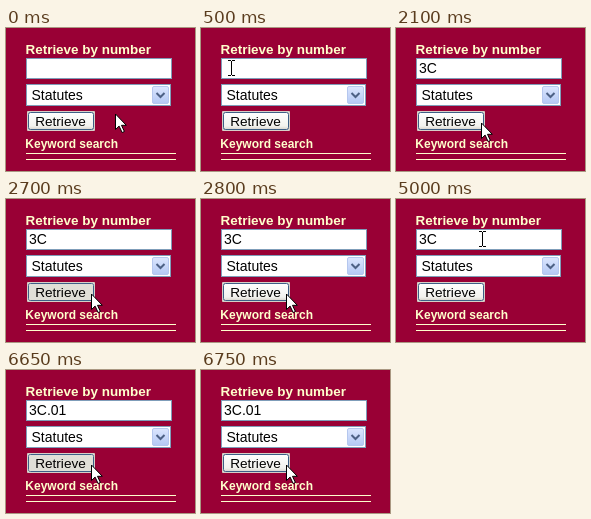
An HTML page for the animation above (8000 ms loop, 189 px wide and 143 px high).

```html
<!DOCTYPE html>
<html lang="en">
<head>
<meta charset="utf-8">
<title>Retrieve by number</title>
<style>
html, body { margin: 0; width: 100%; height: 100%; overflow: hidden; background: #990035; }
svg { display: block; width: 189px; height: 143px; font: 14px "Liberation Sans", Arial, sans-serif; }
.head { font-weight: bold; fill: #ffffcc; }
.crisp { shape-rendering: crispEdges; }

.arrow, .beam, .press, .typed tspan { animation: 8s step-end infinite; }
.arrow { animation-name: arrow; }
.beam { animation-name: beam; }
.press { animation-name: press; }
.typed tspan { visibility: hidden; }
.typed tspan:nth-child(1) { animation-name: key1; }
.typed tspan:nth-child(2) { animation-name: key2; }
.typed tspan:nth-child(3) { animation-name: key3; }
.typed tspan:nth-child(4) { animation-name: key4; }
.typed tspan:nth-child(5) { animation-name: key5; }

@keyframes arrow {
  0% { transform: translate(109px, 85px); }
  6.25%, 62.5% { transform: translate(-50px, 0); }
  26.25%, 80%, 100% { transform: translate(85px, 94px); }
}
@keyframes beam {
  0%, 26.25%, 80%, 100% { transform: translate(-50px, 0); }
  6.25% { transform: translate(27px, 32px); }
  12.5% { transform: translate(128px, 32px); }
  62.5% { transform: translate(83px, 32px); }
}
@keyframes press {
  0%, 35%, 84.375%, 100% { opacity: 0; }
  33.75%, 83.125% { opacity: 1; }
}
@keyframes key1 { 0% { visibility: hidden; } 12.5%, 100% { visibility: visible; } }
@keyframes key2 { 0% { visibility: hidden; } 20%, 100% { visibility: visible; } }
@keyframes key3 { 0% { visibility: hidden; } 65%, 100% { visibility: visible; } }
@keyframes key4 { 0% { visibility: hidden; } 68.75%, 100% { visibility: visible; } }
@keyframes key5 { 0% { visibility: hidden; } 74.375%, 100% { visibility: visible; } }
</style>
</head>
<body>
<svg viewBox="0 0 189 143">
  <defs>
    <linearGradient id="face" x2="0" y2="1">
      <stop offset="0" stop-color="#fff"/>
      <stop offset=".8" stop-color="#f2f2ee"/>
      <stop offset="1" stop-color="#d8d4cc"/>
    </linearGradient>
    <linearGradient id="drop" x2="0" y2="1">
      <stop offset="0" stop-color="#dce6fe"/>
      <stop offset="1" stop-color="#b4c8f4"/>
    </linearGradient>
  </defs>

  <text class="head" x="19.5" y="26" font-size="13.45">Retrieve by number</text>

  <!-- text field -->
  <rect class="crisp" x="20.5" y="30.5" width="145" height="20" fill="#fff" stroke="#7f9db9"/>
  <text class="typed" x="23" y="45"><tspan>3</tspan><tspan>C</tspan><tspan>.</tspan><tspan>0</tspan><tspan>1</tspan></text>

  <!-- drop-down -->
  <rect class="crisp" x="20.5" y="56.5" width="144" height="21" fill="#fff" stroke="#7f9db9"/>
  <text x="25.5" y="72">Statutes</text>
  <rect x="146.5" y="58.5" width="16" height="17" rx="1.5" fill="url(#drop)" stroke="#b5c7ee"/>
  <path d="M150.5 65l4 4 4-4" fill="none" stroke="#4d6185" stroke-width="2"/>

  <!-- button -->
  <rect x="21" y="83" width="68" height="20" rx="1" fill="#d6cfc8"/>
  <rect x="22.5" y="84.5" width="65" height="17" rx="2" fill="url(#face)" stroke="#3c5f86"/>
  <rect class="press" x="23" y="85" width="64" height="16" rx="1.5" fill="#e0dfd7"/>
  <text x="29.2" y="98" font-size="13.6">Retrieve</text>

  <text class="head" x="19.3" y="120" font-size="12">Keyword search</text>
  <path class="crisp" d="M20 125.5h150M20 131.5h150" stroke="#ffffcc"/>

  <path class="beam crisp" d="M0 .5h3M4 .5h3M3.5 1v14M0 15.5h3M4 15.5h3" fill="none" stroke="#000"/>
  <path class="arrow" d="M.5 1v15.5l3.6-3.4 3 6.4 2.3-1-2.9-6.2h4.8z" fill="#fff" stroke="#000"/>
</svg>
</body>
</html>
```
